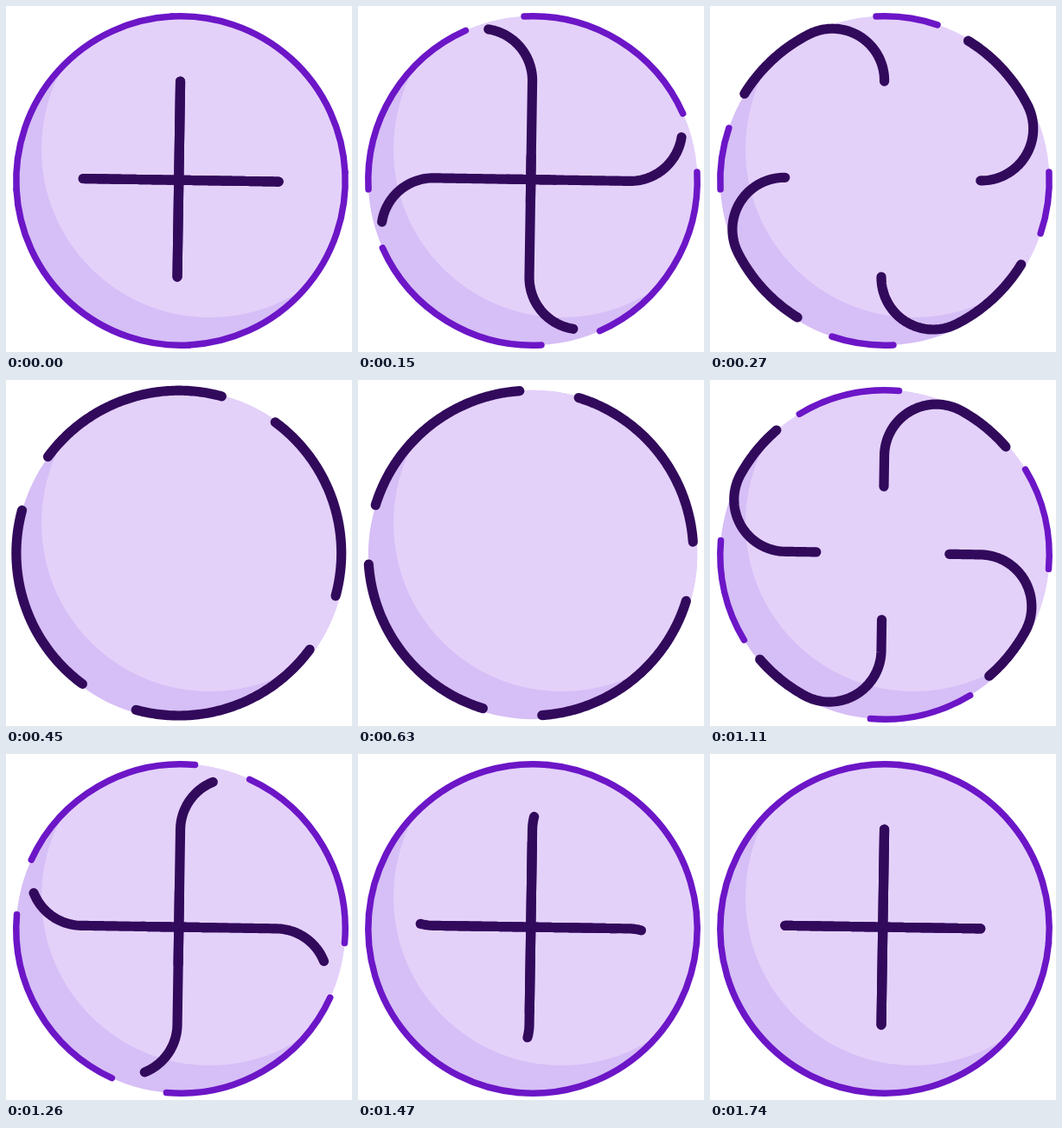
An HTML page with a canvas that plays this animation: 400x400 px, repeating every 3860 ms.

```html
<!DOCTYPE html>
<html lang="en">
<head>
<meta charset="utf-8">
<title>Plus swirl</title>
<style>
html, body { margin: 0; width: 100%; height: 100%; overflow: hidden; background: #fff; }
canvas { display: block; width: 100vw; height: 100vh; }
</style>
</head>
<body>
<canvas id="stage"></canvas>
<script>
const SIZE = 400, LOOP = 3860, STEP = 30, END = 1740;
const LIGHT = '#e4d1fa', SHADE = '#d6bef6', RING = '#6c16c7', DARK = '#320a5c';
const RAD = Math.PI / 180;

const canvas = document.getElementById('stage');
const ctx = canvas.getContext('2d');
const scale = window.devicePixelRatio || 1;
canvas.width = canvas.height = SIZE * scale;

// Each stroke runs along its bar, round a bend, 1.5 turns of the rim, and back.
const HALF = 113, BAR = 2 * HALF, RIM = 187.9;
const BEND = (RIM * RIM - HALF * HALF) / (2 * RIM);
const ENTRY = Math.atan2(BEND, HALF);
const BEND_LEN = BEND * (Math.PI / 2 + ENTRY);
const LEAD_IN = BAR + BEND_LEN;
const TOTAL = 2 * LEAD_IN + RIM * (3 * Math.PI - 2 * ENTRY);
const TRAVEL = TOTAL - BAR;

// [time, distance travelled]
const KEYS = [
  [0, 0], [270, 226], [630, 864], [870, 1424.5], [1110, 1870.5], [1260, 1990],
  [1440, TRAVEL - 20], [1620, TRAVEL - 1.5], [END, TRAVEL]
];

const slope = i => (KEYS[i + 1][1] - KEYS[i][1]) / (KEYS[i + 1][0] - KEYS[i][0]);

function tangent(i) {
  if (i === 0 || i === KEYS.length - 1) return 0;
  const before = KEYS[i][0] - KEYS[i - 1][0], after = KEYS[i + 1][0] - KEYS[i][0];
  return (slope(i - 1) * after + slope(i) * before) / (before + after);
}

function travel(t) {
  if (t >= END) return TRAVEL;
  let i = 0;
  while (t >= KEYS[i + 1][0]) i++;
  const [t0, a] = KEYS[i], [t1, b] = KEYS[i + 1];
  const h = t1 - t0, u = (t - t0) / h, v = 1 - u;
  return a * v * v * (1 + 2 * u) + b * u * u * (3 - 2 * u)
    + h * u * v * (tangent(i) * v - tangent(i + 1) * u);
}

function pointAt(s) {
  if (s > TOTAL / 2) {
    const [x, y] = pointAt(TOTAL - s);
    return [x, -y];
  }
  if (s < BAR) return [0, HALF - s];
  if (s < LEAD_IN) {
    const a = (s - BAR) / BEND;
    return [BEND * (Math.cos(a) - 1), -HALF - BEND * Math.sin(a)];
  }
  const a = ENTRY + (s - LEAD_IN) / RIM;
  return [-RIM * Math.sin(a), -RIM * Math.cos(a)];
}

function disc(x, y, r, color) {
  ctx.fillStyle = color;
  ctx.beginPath();
  ctx.arc(x, y, r, 0, 2 * Math.PI);
  ctx.fill();
}

function drawBase() {
  ctx.save();
  disc(202, 202, 190.2, SHADE);
  ctx.beginPath();
  ctx.arc(202, 202, 190.2, 0, 2 * Math.PI);
  ctx.clip();
  disc(235.5, 165.5, 194.5, LIGHT);
  ctx.restore();
}

// Four equal arcs; angles are clockwise degrees from the top.
function drawRing(from, to) {
  if (to - from < 0.1) return;
  ctx.strokeStyle = RING;
  ctx.lineWidth = 7.5;
  for (let k = 0; k < 4; k++) {
    ctx.beginPath();
    ctx.arc(202, 202, 190.2, (from + 90 * k - 90) * RAD, (to + 90 * k - 90) * RAD);
    ctx.stroke();
  }
}

function ring(t) {
  if (t < 600) {
    drawRing(-3, 87 - Math.min(90, 68.3 * (t / 270) ** 2));
  } else if (t > 998) {
    const rest = 1 - Math.min(1, (t - 998) / 493);
    drawRing(5 - 90 * (1 - rest * rest), 5);
  }
}

function drawStrokes(t) {
  const start = travel(t), parts = 90;
  const nudge = Math.max(0, 1 - t / 270);
  ctx.strokeStyle = DARK;
  ctx.lineWidth = 11.2;
  for (let k = 0; k < 4; k++) {
    ctx.save();
    ctx.translate(199.8, 200.1);
    if (k % 2) ctx.translate(2.4 * nudge, 1.2 * nudge);
    ctx.rotate((0.9 + 90 * k) * RAD);
    ctx.beginPath();
    for (let i = 0; i <= parts; i++) ctx.lineTo(...pointAt(start + BAR * i / parts));
    ctx.stroke();
    ctx.restore();
  }
}

function frame(now) {
  const t = Math.floor((now % LOOP) / STEP) * STEP;
  ctx.setTransform(scale, 0, 0, scale, 0, 0);
  ctx.fillStyle = '#fff';
  ctx.fillRect(0, 0, SIZE, SIZE);
  ctx.lineCap = ctx.lineJoin = 'round';
  drawBase();
  ring(t);
  drawStrokes(t);
}

const origin = performance.now();
function tick() {
  frame(performance.now() - origin);
  requestAnimationFrame(tick);
}
tick();
</script>
</body>
</html>
```
